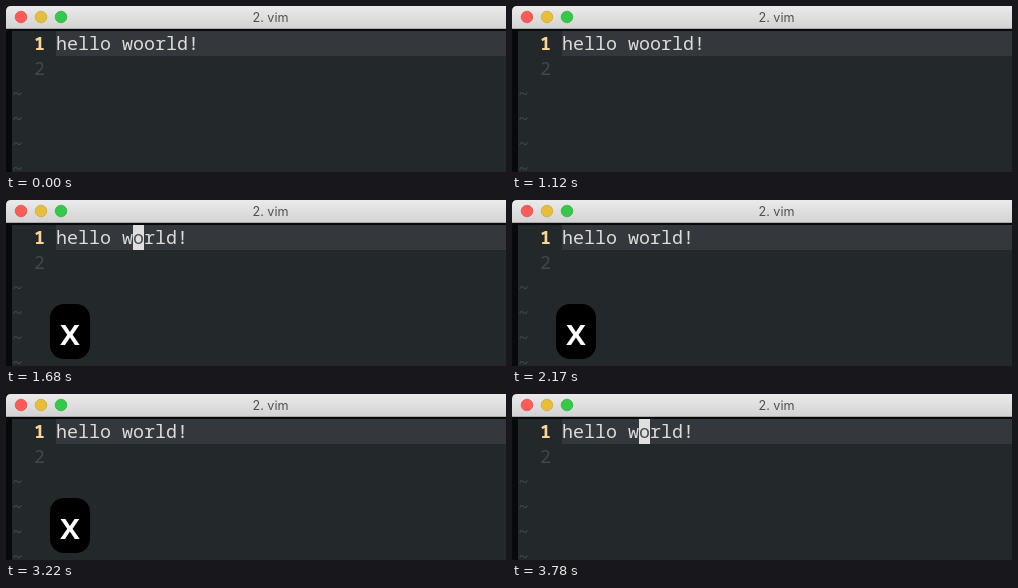
Write an HTML page that moves like this. It is 500 px wide and 166 px high and loops after 3920 ms.

```html
<!DOCTYPE html>
<html lang="en">
<head>
<meta charset="utf-8">
<title>Terminal editing</title>
<style>
  html, body { margin: 0; width: 100%; height: 100%; overflow: hidden; background: #23282b; }
  svg { display: block; width: 100%; height: 100%; }
  .mono { font: 500 18.33px "Noto Sans Mono", "DejaVu Sans Mono", monospace; }
  .title { font: 12.6px Inter, "Liberation Sans", sans-serif; fill: #505050; text-anchor: middle; }
  .key { font: 600 37px "Open Sans", "Noto Sans", sans-serif; text-anchor: middle; }
  .dim { fill: #43474a; }
</style>
</head>
<body>
<svg viewBox="0 0 500 166" xmlns="http://www.w3.org/2000/svg">
  <defs>
    <linearGradient id="bar" x2="0" y2="1">
      <stop offset="0" stop-color="#ebebeb"/>
      <stop offset="1" stop-color="#d3d3d3"/>
    </linearGradient>
  </defs>
  <rect width="500" height="166" fill="#08090a"/>
  <path d="M0 22V5Q0 0 5 0H500V22Z" fill="url(#bar)"/>
  <rect y="22" width="500" height="1" fill="#a9a9a9"/>
  <g stroke-width=".7">
    <circle cx="15" cy="11" r="5.8" fill="#fc5b57" stroke="#df4744"/>
    <circle cx="35" cy="11" r="5.8" fill="#e5bf3c" stroke="#d0a52c"/>
    <circle cx="55" cy="11" r="5.8" fill="#35c84a" stroke="#28ae3a"/>
  </g>
  <text class="title" x="264.5" y="16">2. vim</text>
  <rect x="6" y="25" width="494" height="141" fill="#23282b"/>
  <rect x="50" y="25" width="450" height="25" fill="#34373c"/>
  <g class="mono">
    <text x="28" y="44" fill="#fbd595" font-weight="700">1</text>
    <text x="28" y="69" class="dim">2</text>
    <g id="tildes" class="dim"></g>
    <text id="line" x="50" y="44" fill="#dcdcda"></text>
    <g id="cursor">
      <rect x="127" y="25" width="11" height="25" fill="#dfdfdd"/>
      <text x="127" y="44" fill="#4a4d50">o</text>
    </g>
  </g>
  <rect id="cap" x="44" y="104" width="40" height="55" rx="14" fill="#000"/>
  <text id="key" class="key" x="64" y="145" fill="#fff">x</text>
</svg>
<script>
  const LOOP = 3920, STEP = 70, BLINK = 560;
  const PRESS = 1260, EDIT = 1330, RELEASE = 3360, GONE = 3570;
  const $ = id => document.getElementById(id);
  const clamp = v => Math.max(0, Math.min(1, v));
  const line = $("line"), cursor = $("cursor"), cap = $("cap"), key = $("key");

  $("tildes").innerHTML = [0, 1, 2, 3]
    .map(i => `<text x="6" y="${94 + i * 25}">~</text>`).join("");

  function draw(ms) {
    const t = Math.floor((ms % LOOP) / STEP) * STEP;
    const text = t < EDIT ? "hello woorld!" : "hello world!";
    if (line.textContent !== text) line.textContent = text;

    // The last blink starts one step early.
    const lit = t >= GONE || (t >= 280 && Math.floor((t - 280) / BLINK) % 2 === 0);
    cursor.setAttribute("visibility", lit ? "visible" : "hidden");

    const shown = t >= PRESS && t < GONE;
    const fade = t < RELEASE ? 1 : clamp(0.68 - (t - RELEASE) / 250);
    key.setAttribute("opacity", shown ? fade : 0);
    cap.setAttribute("opacity", shown ? clamp(fade * 2 - 0.8) : 0);
  }

  const start = performance.now();
  function tick() {
    draw(performance.now() - start);
    requestAnimationFrame(tick);
  }
  tick();
</script>
</body>
</html>
```
